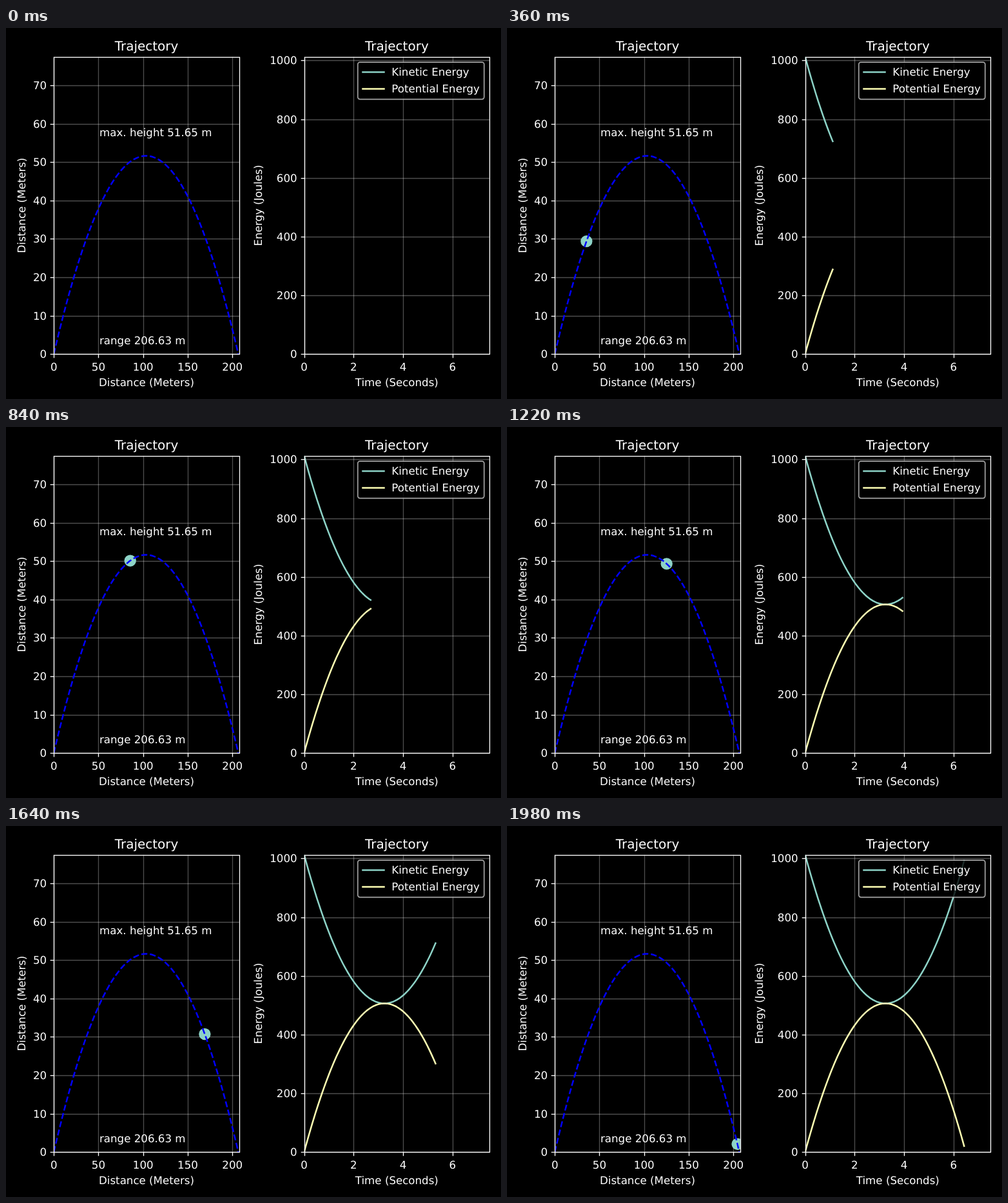
Animation of 768 by 576 pixels, one loop 2 s. Source, as an HTML page:

```html
<!DOCTYPE html>
<html lang="en">
<head>
<meta charset="utf-8">
<title>Trajectory</title>
<style>
  html, body { margin: 0; width: 100%; height: 100%; overflow: hidden; background: #000; }
  svg { display: block; width: 768px; height: 576px; }
  text { font: 16.67px "DejaVu Sans", Verdana, sans-serif; fill: #fff; text-rendering: geometricPrecision; }
  .title { font-size: 20px; }
  .mid { text-anchor: middle; }
  .end { text-anchor: end; }
  .grid { stroke: #fff; stroke-opacity: .3; stroke-width: 1.33; }
  .axis { stroke: #fff; stroke-width: 1.33; fill: none; }
  .line { fill: none; stroke-width: 2.5; stroke-linejoin: round; stroke-linecap: square; }
  .path { stroke: #00f; stroke-dasharray: 9.25 4; stroke-linecap: butt; }
  .kinetic { stroke: #8dd3c7; }
  .potential { stroke: #feffb3; }
  .box { fill: #000; fill-opacity: .8; stroke: #ccc; stroke-opacity: .8; stroke-width: 1.67; }
</style>
</head>
<body>
<svg id="stage" viewBox="0 0 768 576"></svg>
<script>
const STEPS = 100, STEP_MS = 20;
const TOP = 44.72, BOTTOM = 506.12;

// Unit mass launched at 45 m/s and 45 degrees.
const g = 9.8, speed = 45, v = speed * Math.SQRT1_2;
const flight = 2 * v / g, range = v * flight, peak = v * v / (2 * g);
const total = speed * speed / 2;
const height = t => v * t - g * t * t / 2;
const times = Array.from({ length: STEPS }, (_, i) => flight * i / (STEPS - 1));

const stage = document.getElementById('stage');

function add(name, attrs, text) {
  const node = document.createElementNS('http://www.w3.org/2000/svg', name);
  for (const key in attrs) node.setAttribute(key, attrs[key]);
  if (text !== undefined) node.textContent = text;
  return stage.appendChild(node);
}

const label = (x, y, text, cls = '') => add('text', { x, y, class: cls }, text);
const rule = (x1, y1, x2, y2, cls) => add('line', { x1, y1, x2, y2, class: cls });
const snap = n => Math.round(n) + .5;

function makePlot(left, right, xMax, yMax, xStep, yStep) {
  const plot = {
    left, right,
    x: n => left + n / xMax * (right - left),
    y: n => BOTTOM - n / yMax * (BOTTOM - TOP),
    xTicks: [], yTicks: []
  };
  for (let n = 0; n < xMax; n += xStep) plot.xTicks.push(n);
  for (let n = 0; n < yMax; n += yStep) plot.yTicks.push(n);
  plot.point = (a, b) => plot.x(a).toFixed(2) + ',' + plot.y(b).toFixed(2);
  plot.clip = 'clip' + Math.round(left);
  const clip = add('clipPath', { id: plot.clip });
  clip.append(add('rect', { x: left, y: TOP, width: right - left, height: BOTTOM - TOP }));
  for (const n of plot.xTicks) rule(snap(plot.x(n)), TOP, snap(plot.x(n)), BOTTOM, 'grid');
  for (const n of plot.yTicks) rule(left, snap(plot.y(n)), right, snap(plot.y(n)), 'grid');
  return plot;
}

function drawAxes(plot, xName, yName, yNameX) {
  const x = snap(plot.left), y = snap(TOP), mid = (plot.left + plot.right) / 2;
  add('rect', { x, y, width: snap(plot.right) - x, height: snap(BOTTOM) - y, class: 'axis' });
  for (const n of plot.xTicks) {
    const tx = snap(plot.x(n));
    rule(tx, 506.5, tx, 512.3, 'axis');
    label(plot.x(n), 532, n, 'mid');
  }
  for (const n of plot.yTicks) {
    const ty = snap(plot.y(n));
    rule(x - 5.8, ty, x, ty, 'axis');
    label(plot.left - 11, Math.round(plot.y(n)) + 6, n, 'end');
  }
  label(mid, 35, 'Trajectory', 'title mid');
  label(mid, 556, xName, 'mid');
  add('text', { transform: `translate(${yNameX} 275.5) rotate(-90)`, class: 'mid' }, yName);
}

const curve = (plot, cls) =>
  add('polyline', { class: 'line ' + cls, 'clip-path': `url(#${plot.clip})` });

// Flight
const space = makePlot(74.2, 361.8, range + 1, peak * 1.5, 50, 10);
const ball = add('circle', { r: 9.17, fill: '#8dd3c7', 'clip-path': `url(#${space.clip})` });
curve(space, 'path').setAttribute('points', times.map(t => space.point(v * t, height(t))).join(' '));
drawAxes(space, 'Distance (Meters)', 'Distance (Meters)', 30);
label(145, 168, 'max. height 51.65 m');
label(145, 491, 'range 206.63 m');

// Energy
const energy = makePlot(462.6, 750.1, flight + 1, total, 2, 200);
const curves = [
  [curve(energy, 'kinetic'), times.map(t => energy.point(t, total - g * height(t)))],
  [curve(energy, 'potential'), times.map(t => energy.point(t, g * height(t)))]
];
drawAxes(energy, 'Time (Seconds)', 'Energy (Joules)', 397);

// Legend
add('rect', { x: 545.8, y: 53.05, width: 196, height: 57.6, rx: 3.3, class: 'box' });
[['Kinetic', 68.5], ['Potential', 94.5]].forEach(([name, y]) => {
  rule(553.5, y, 586.5, y, 'line ' + name.toLowerCase());
  label(598.3, y + 5.5, name + ' Energy');
});

function draw(step) {
  const last = step - 1;
  ball.setAttribute('visibility', last < 0 ? 'hidden' : 'visible');
  if (last >= 0) {
    ball.setAttribute('cx', space.x(v * times[last]));
    ball.setAttribute('cy', space.y(height(times[last])));
  }
  for (const [node, points] of curves) node.setAttribute('points', points.slice(0, step).join(' '));
}

const start = performance.now();
function tick() {
  draw(Math.floor((performance.now() - start) / STEP_MS) % STEPS);
  requestAnimationFrame(tick);
}
tick();
</script>
</body>
</html>
```
